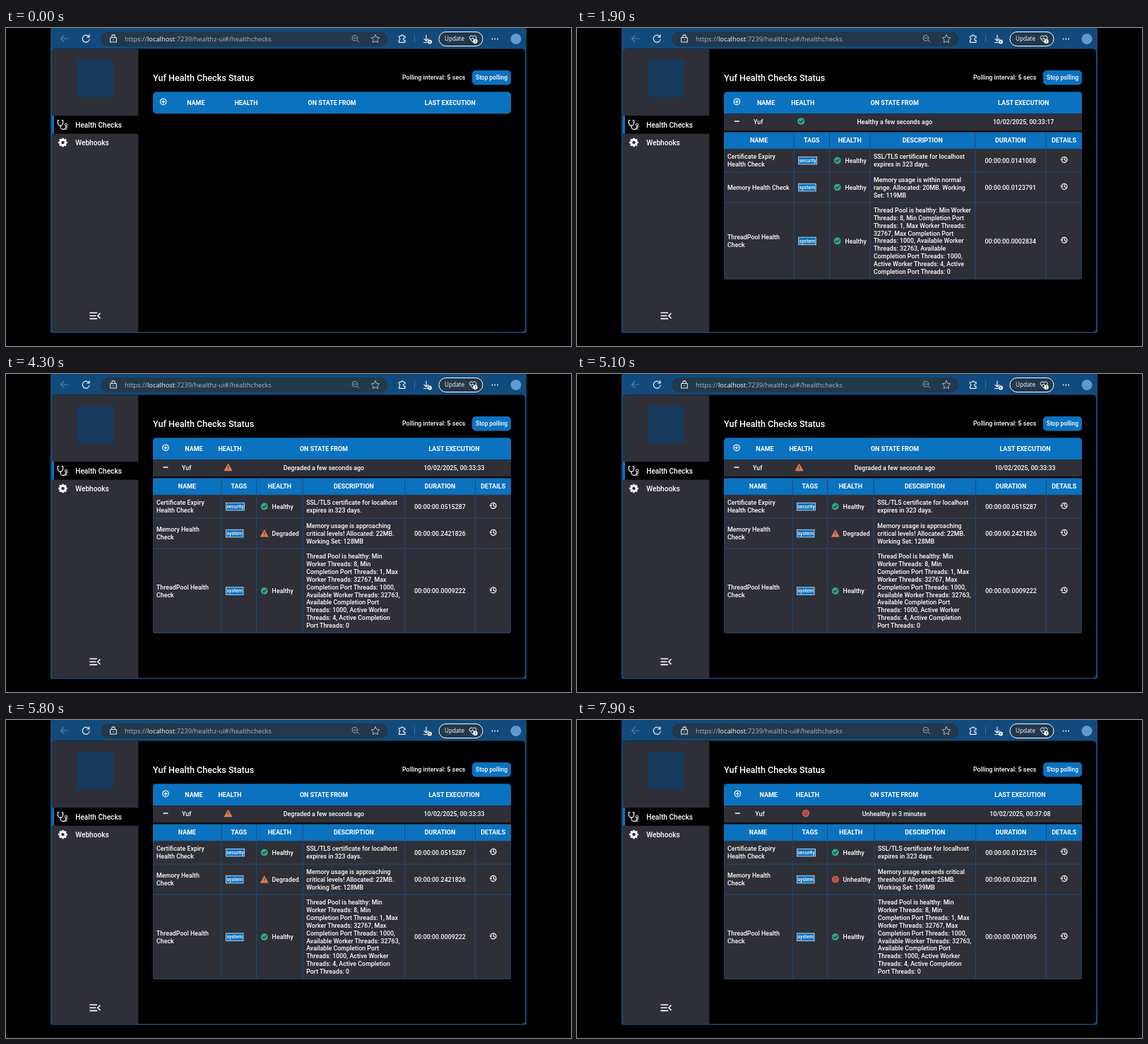
Write an HTML page that moves like this. It is 800 by 450 pixels and loops after 8000 ms.

```html
<!DOCTYPE html>
<html lang="en">
<head>
<meta charset="utf-8">
<title>Health checks</title>
<style>
html, body { margin: 0; width: 100%; height: 100%; overflow: hidden; background: #000; }
svg { display: block; width: 800px; height: 450px; font-family: Roboto, sans-serif; }
text { white-space: pre; }
</style>
</head>
<body>
<svg id="stage" viewBox="0 0 800 450" xmlns="http://www.w3.org/2000/svg"></svg>
<script>
const LOOP = 8000;
const BLUE = '#0b72bf', PANEL = '#2f2f38', LINE = '#1b4c79', FIELD = '#22384d', NAME = 'Yuf';

const text = (x, y, str, { size = 8.86, fill = '#fff', weight = 500, anchor = 'start', extra = '' } = {}) =>
  `<text x="${x}" y="${y}" font-size="${size}" fill="${fill}" font-weight="${weight}" text-anchor="${anchor}" ${extra}>${str}</text>`;
const centered = (x, y, str) => text(x, y, str, { anchor: 'middle' });
const columnTitle = (x, y, str) => text(x, y, str, { anchor: 'middle', weight: 700, size: 8.96 });
const rect = (x, y, w, h, fill, extra = '') =>
  `<rect x="${x}" y="${y}" width="${w}" height="${h}" fill="${fill}" ${extra}/>`;
const stroke = (d, width = 1, color = '#fff', extra = '') =>
  `<path d="${d}" fill="none" stroke="${color}" stroke-width="${width}" stroke-linecap="round" stroke-linejoin="round" ${extra}/>`;
const at = (x, y, body, scale = 1) => `<g transform="translate(${x} ${y}) scale(${scale})">${body}</g>`;

const statusIcon = {
  Healthy: '<circle r="5" fill="#35a387"/>' + stroke('M-2.3 .1L-.7 1.7L2.4-1.5', 1.2, '#20303a'),
  Degraded: '<path d="M0-5L5.5 4.8H-5.5Z" fill="#e17f55" stroke="#e17f55" stroke-width=".6" stroke-linejoin="round"/>' +
    stroke('M0-1.6V1.2M0 3V3.1', 1.1, '#4a3030'),
  Unhealthy: '<circle r="5.1" fill="#c85d53"/><circle r="2.6" fill="none" stroke="#83413f" stroke-width="1"/><circle r="1" fill="#83413f"/>'
};
const plusIcon = '<circle r="4.3" fill="none" stroke="#fff" stroke-width="1.1"/>' + stroke('M-2.2 0H2.2M0-2.2V2.2', 1.2);
const historyIcon = stroke('M-3.6-1.6A4 4 0 1 1-3.2 2.6M-4.7-.6L-3.8 1L-2.3-.3M.3-2.2V.3L2 1.4', 1.2);

function browser() {
  return rect(63, 0, 674, 431.5, '#124b7b', 'rx="2"') +
    rect(134, 5, 406.5, 21, FIELD, 'rx="10.5"') +
    stroke('M88 15H77.5M82 10.5L77.5 15L82 19.5', 1.1, '#57819f') +
    stroke('M117.5 12.5A5 5 0 1 0 118.2 16M118 9.5V12.8H114.7', 1.2, '#e8eef4') +
    stroke('M147.7 13.5H156.3V20H147.7ZM149.8 13.3V11.8A2.2 2.2 0 0 1 154.2 11.8V13.3M152 16.4V17', 1.1, '#e3eaf0') +
    text(168, 19, '<tspan>https://</tspan><tspan fill="#f2f5f8">localhost</tspan><tspan>:7239/healthz-ui#/healthchecks</tspan>',
      { size: 9.37, fill: '#a9b5c1', weight: 400, extra: 'font-family="Open Sans, sans-serif"' }) +
    stroke('M497.2 17.2L500 20M491.8 14.2H496M497.8 14.2A3.9 3.9 0 1 1 490 14.2A3.9 3.9 0 1 1 497.8 14.2', 1, '#8fa2b3') +
    stroke('M523 9.5L524.8 13.2L528.8 13.8L525.9 16.6L526.6 20.6L523 18.7L519.4 20.6L520.1 16.6L517.2 13.8L521.2 13.2Z', 1, '#a9bac8') +
    stroke('M556.5 11.5H559.3A1.6 1.6 0 0 1 562.5 11.5H565V14H563.8A1.7 1.7 0 0 0 563.8 17.3H565V20.3H556.5V17.3A1.7 1.7 0 0 0 556.5 14Z', 1.2, '#e8eef4') +
    stroke('M578.5 10V20', 1, '#3f6d95') +
    stroke('M595 10V18M592 15.3L595 18.2L598 15.3M591.5 20.5H597', 1.2, '#e8eef4') +
    '<circle cx="600" cy="19.5" r="3" fill="#fff"/>' + stroke('M599 18.5L601 20.5M601 18.5L599 20.5', .8, '#334') +
    rect(613, 5.5, 62, 20, FIELD, 'rx="10" stroke="#fff"') +
    text(621, 18.3, 'Update', { size: 8.2, weight: 400, extra: 'font-family="Open Sans, sans-serif"' }) +
    stroke('M661 20L656.8 15.5A2.7 2.7 0 0 1 661 12A2.7 2.7 0 0 1 665.5 15.5M658 15.3H660L661.2 13.8L662.5 16.5', 1) +
    '<circle cx="664.5" cy="18.7" r="3.2" fill="#fff"/>' + stroke('M664.5 17V19M664.5 20.3V20.4', .8, '#234') +
    [688.5, 692.3, 696.1].map(x => `<circle cx="${x}" cy="15.5" r=".9" fill="#fff"/>`).join('') +
    '<circle cx="722" cy="15.5" r="7.5" fill="#5d9bd2"/>' +
    rect(65, 29.5, 670, 400.5, '#000', 'rx="5"');
}

function gear() {
  const teeth = Array.from({ length: 8 }, (_, i) =>
    rect(-1.4, -6.3, 2.8, 3, '#fff', `rx=".6" transform="rotate(${i * 45})"`)).join('');
  return teeth + '<circle r="3.6" fill="none" stroke="#fff" stroke-width="2.7"/>';
}

function sidebar() {
  return rect(65, 29.5, 122.3, 400.5, PANEL) +
    rect(100.5, 45, 51.5, 53.5, '#17395c') +
    rect(65, 124, 122.3, 25.6, '#000') + rect(65, 124, 3, 25.6, BLUE) +
    stroke('M75 130.5H73.4V134.5A3.6 3.6 0 0 0 80.6 134.5V130.5H79M77 138.2V139.5A4 4 0 0 0 85 139.5V138', 1.2) +
    '<circle cx="85" cy="136.8" r="1.7" fill="none" stroke="#fff"/>' +
    stroke('M81 143H86.5M84 141A2.6 2.6 0 0 0 87.5 139', .9) +
    at(80.5, 162, gear()) +
    text(98.2, 140.6, 'Health Checks', { size: 10.15 }) +
    text(98.2, 165.8, 'Webhooks', { size: 10.15 }) +
    stroke('M119 403H128.5M119 407.2H127M119 411.4H128.5M133 404L129.8 407.2L133 410.4', 1.6);
}

function heading() {
  return text(208, 74.6, `${NAME} Health Checks Status`, { size: 12.6 }) +
    text(561, 73.2, 'Polling interval: <tspan font-weight="700">5</tspan> secs') +
    rect(660, 60, 55, 20.5, BLUE, 'rx="5"') +
    text(687.5, 73.3, 'Stop polling', { size: 8.43, anchor: 'middle' });
}

// cols: plus, name, health, state and execution centres
function headRow(cols, open) {
  const shape = open
    ? `<path d="M208 121.3V95.3Q208 90.3 213 90.3H710Q715 90.3 715 95.3V121.3Z" fill="${BLUE}"/>`
    : rect(208, 90.3, 507, 31, BLUE, 'rx="5"');
  return shape + at(cols[0], 104.3, plusIcon) +
    ['NAME', 'HEALTH', 'ON STATE FROM', 'LAST EXECUTION']
      .map((label, i) => columnTitle(cols[i + 1], 109, label)).join('');
}

function summary({ cols, nameX, iconX, status, since, date }) {
  return headRow(cols, true) + rect(208, 121.3, 507, 24, PANEL, 'class="row"') +
    stroke(`M${cols[0] - 3} 132H${cols[0] + 3}`, 1.3) +
    text(nameX, 136, NAME) + at(iconX, 132, statusIcon[status], 1.02) +
    centered(cols[3], 136, since) + centered(cols[4], 136, date);
}

function details({ edges, bottom, checks }) {
  const ys = [171, 204, 247, bottom];
  const mid = i => (edges[i] + edges[i + 1]) / 2;
  const block = (x, cy, lines) => lines.map((line, i) =>
    text(x, cy + 3.1 + (i - (lines.length - 1) / 2) * 10.9, line)).join('');
  let out = rect(208, 147.5, 507, bottom - 147.5, PANEL, 'rx="3"') + rect(208, 147.5, 507, 23.5, BLUE);
  out += ['NAME', 'TAGS', 'HEALTH', 'DESCRIPTION', 'DURATION', 'DETAILS']
    .map((label, i) => columnTitle(mid(i), 162.4, label)).join('');
  out += stroke(edges.slice(1, -1).map(x => `M${x} 148V${bottom}`).join('') +
    ys.slice(1, 3).map(y => `M208 ${y}H715`).join(''), 1, LINE);
  out += rect(208.5, 171, 506, bottom - 171.5, 'none', `rx="2" stroke="${LINE}" stroke-width=".8"`);
  checks.forEach(({ name, tag, status, desc, time }, i) => {
    const cy = (ys[i] + ys[i + 1]) / 2;
    const tagX = edges[1] + 6.5, tagW = tag === 'security' ? 26 : 24.5;
    out += block(213, cy, name) +
      rect(tagX, cy - 5.2, tagW, 10.6, BLUE, 'stroke="#dce8f2" stroke-width=".8"') +
      text(tagX + tagW / 2, cy + 2.4, tag, { size: 6.9, anchor: 'middle' }) +
      at(edges[2] + 11.2, cy, statusIcon[status]) + text(edges[2] + 22, cy + 3.2, status) +
      block(edges[3] + 5, cy, desc) + centered(mid(4), cy + 3.2, `00:00:00.${time}`) +
      at(690, cy - 1.3, historyIcon);
  });
  return out;
}

const POOL = {
  narrow: ['Thread Pool is healthy: Min Worker', 'Threads: 8, Min Completion Port', 'Threads: 1, Max Worker Threads:',
    '32767, Max Completion Port', 'Threads: 1000, Available Worker', 'Threads: 32763, Available',
    'Completion Port Threads: 1000,', 'Active Worker Threads: 4, Active', 'Completion Port Threads: 0'],
  wide: ['Thread Pool is healthy: Min', 'Worker Threads: 8, Min', 'Completion Port Threads: 1, Max',
    'Worker Threads: 32767, Max', 'Completion Port Threads: 1000,', 'Available Worker Threads: 32763,',
    'Available Completion Port', 'Threads: 1000, Active Worker', 'Threads: 4, Active Completion', 'Port Threads: 0']
};
const EDGES = {
  narrow: [208, 307.2, 357.5, 415, 563.5, 664, 715],
  wide: [208, 305, 354.6, 420.2, 564.6, 664.5, 715]
};

function makeChecks(layout, status, memory, times) {
  const memoryName = layout === 'narrow' ? ['Memory Health Check'] : ['Memory Health', 'Check'];
  return [
    { name: ['Certificate Expiry', 'Health Check'], tag: 'security', status: 'Healthy',
      desc: ['SSL/TLS certificate for localhost', 'expires in 323 days.'], time: times[0] },
    { name: memoryName, tag: 'system', status, desc: memory, time: times[1] },
    { name: ['ThreadPool Health', 'Check'], tag: 'system', status: 'Healthy', desc: POOL[layout], time: times[2] }
  ];
}

const healthyCols = { cols: [226.3, 267.6, 319.8, 449.7, 632.2], nameX: 250, iconX: 317.2,
  status: 'Healthy', since: 'Healthy a few seconds ago' };
const normal = (mb, set) => ['Memory usage is within normal', `range. Allocated: ${mb}MB. Working`, `Set: ${set}MB`];

// Polling results, each shown from `start` until the next one
const polls = [
  { start: 100, layout: 'narrow', ...healthyCols, date: '10/02/2025, 00:33:17',
    memory: normal(20, 119), times: ['0141008', '0123791', '0002834'] },
  { start: 2000, layout: 'narrow', ...healthyCols, date: '10/02/2025, 00:33:22',
    memory: normal(21, 123), times: ['0257000', '0195453', '0010506'] },
  { start: 4100, layout: 'wide', cols: [226, 266, 317, 450, 634.5], nameX: 249, iconX: 314.6,
    status: 'Degraded', since: 'Degraded a few seconds ago', date: '10/02/2025, 00:33:33',
    memory: ['Memory usage is approaching', 'critical levels! Allocated: 22MB.', 'Working Set: 128MB'],
    times: ['0515287', '2421826', '0009222'] },
  { start: 7200, layout: 'wide', cols: [227.4, 271.2, 326.6, 449, 627.4], nameX: 252.3, iconX: 324,
    status: 'Unhealthy', since: 'Unhealthy in 3 minutes', date: '10/02/2025, 00:37:08',
    memory: ['Memory usage exceeds critical', 'threshold! Allocated: 25MB.', 'Working Set: 139MB'],
    times: ['0123125', '0302218', '0001095'] }
];

function pollView(poll) {
  const edges = EDGES[poll.layout].slice();
  if (poll.status === 'Unhealthy') edges[3] += .8;
  return `<g class="poll">${summary(poll)}<g class="details">${details({
    edges, bottom: poll.layout === 'narrow' ? 355.7 : 367,
    checks: makeChecks(poll.layout, poll.status, poll.memory, poll.times)
  })}</g></g>`;
}

function drawer() {
  const big = { size: 10.1 }, small = { size: 7.6 };
  return `<g id="drawer">${rect(448, 29.5, 288, 401.5, PANEL)}` +
    text(458, 59.4, 'Memory Health Check', big) +
    at(463.7, 77.8, statusIcon.Degraded, .95) + text(474, 80.2, 'Degraded', small) +
    rect(478.9, 95, 3.2, 96.5, '#f2f2f2') + `<circle cx="480.5" cy="99" r="5.2" fill="${BLUE}"/>` +
    rect(513.5, 93.8, 212.5, 76.7, PANEL, 'rx="5" stroke="#c9c9cf"') +
    '<path d="M513.5 103.5L509.5 108L513.5 112.5Z" fill="#f2f2f2"/>' +
    at(525, 105, statusIcon.Degraded, .95) + text(535.5, 107.8, 'Degraded', small) +
    text(519, 122.8, 'Memory usage is approaching critical levels!', big) +
    text(519, 139.2, 'Allocated: 22MB. Working Set: 128MB', big) +
    text(519, 157.3, 'February 10, 2025 12:33 AM', { size: 7.6, fill: '#b4b4ba' }) + '</g>';
}

const stage = document.getElementById('stage');
stage.innerHTML = '<clipPath id="page"><rect x="65" y="29.5" width="670" height="400.5" rx="5"/></clipPath>' +
  browser() + '<g clip-path="url(#page)">' + sidebar() + heading() +
  `<g id="empty">${headRow([222.7, 268.8, 340, 461.6, 628.8], false)}</g>` +
  polls.map(pollView).join('') + drawer() + '</g>';

const empty = stage.querySelector('#empty');
const views = [...stage.querySelectorAll('.poll')];
const firstDetails = views[0].querySelector('.details');
const firstRow = views[0].querySelector('.row');
const panel = stage.querySelector('#drawer');

const progress = (t, start, end) => Math.min(1, Math.max(0, (t - start) / (end - start)));
const easeOut = p => 1 - (1 - p) ** 3;
const show = (el, on) => el.setAttribute('display', on ? 'inline' : 'none');

function draw(t) {
  const current = polls.findLastIndex(poll => t >= poll.start);
  show(empty, current < 0);
  views.forEach((view, i) => show(view, i === current));

  // Hovered row turns black while its details fade in
  firstRow.setAttribute('fill', t >= 700 && t < 1700 ? '#000' : PANEL);
  firstDetails.setAttribute('opacity', t < 1100 ? 0 : .4 + .6 * progress(t, 1100, 1300));

  const open = easeOut(progress(t, 6250, 6550)) - progress(t, 6900, 7100) ** 2;
  show(panel, open > 0);
  panel.setAttribute('transform', `translate(${288 * (1 - open)} 0)`);
}

function tick() {
  draw(performance.now() % LOOP);
  requestAnimationFrame(tick);
}
tick();
</script>
</body>
</html>
```
